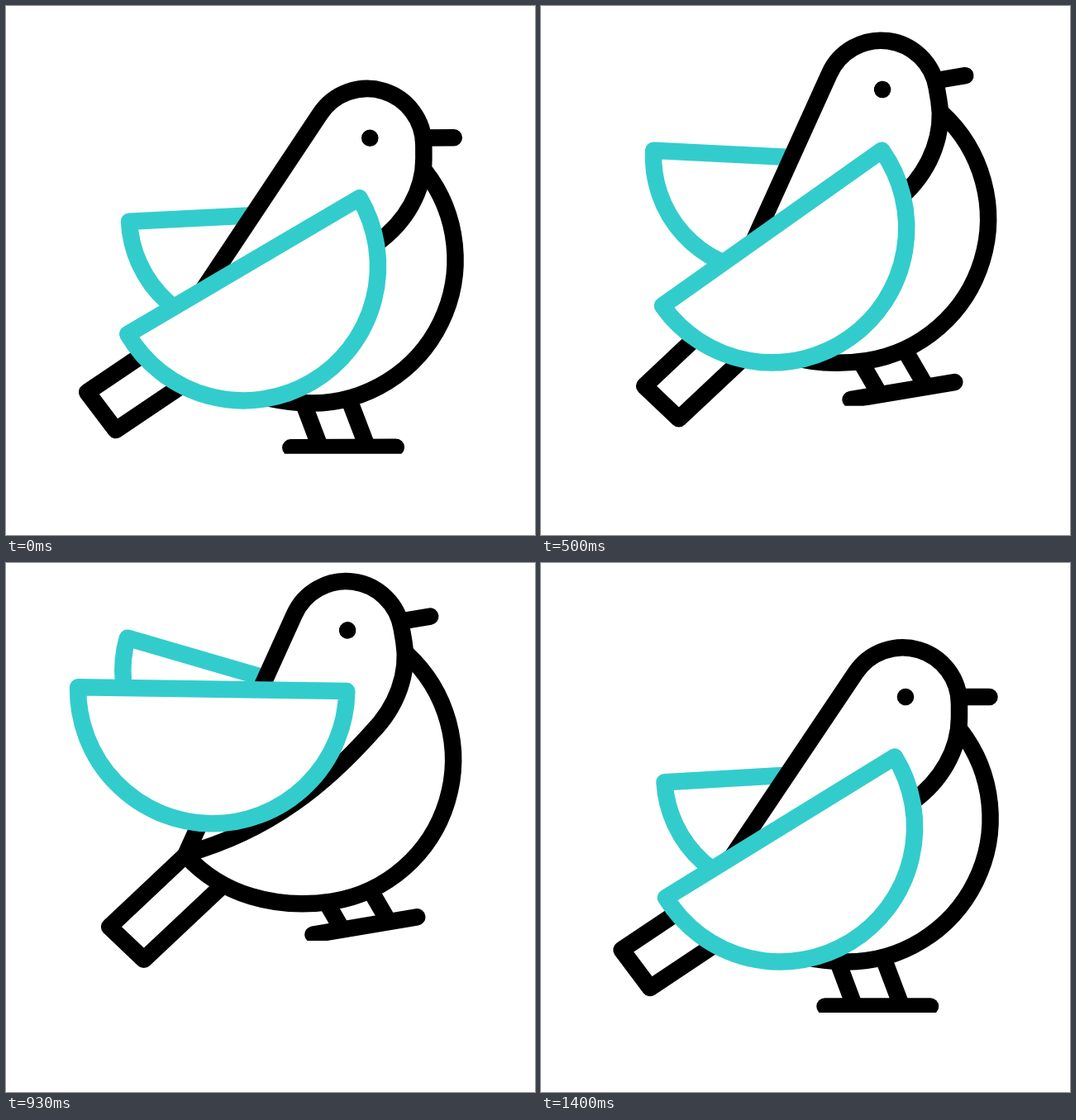
An HTML page with a canvas for the animation above (1670 ms loop, 640 by 640 pixels).

```html
<!DOCTYPE html>
<html lang="en">
<head>
<meta charset="utf-8">
<title>Bird</title>
<style>
html, body { margin: 0; width: 100%; height: 100%; overflow: hidden; background: #fff; }
canvas { display: block; width: 640px; height: 640px; }
</style>
</head>
<body>
<canvas id="stage" width="640" height="640"></canvas>
<script>
const ctx = document.getElementById("stage").getContext("2d");
const LOOP = 1670, BLACK = "#000", TEAL = "#33cccc", STROKE = 20.5;

// Eased progress from 0 to 1 between two steps.
function ease(step, from, to) {
  const u = Math.min(1, Math.max(0, (step - from) / (to - from)));
  return u * u * (3 - 2 * u);
}

// Rest, up to high, down to low, up to high again, back to rest.
function beat(step, { peak, dip, peak2, rest, high, low }) {
  return high * (ease(step, -1, peak) - ease(step, peak2, rest))
    + (high - low) * (ease(step, dip, peak2) - ease(step, peak, dip));
}

const hop = { peak: 9.2, dip: 19.8, peak2: 29.5, rest: 39, high: -65.2, low: -26.5 };
const lean = { ...hop, high: -9.54, low: -9.54 };
const nearFlap = { peak: 8.2, dip: 18.5, peak2: 28.6, rest: 40, high: 42.5, low: -7.6 };
const farFlap = { peak: 11.8, dip: 19.3, peak2: 31.2, rest: 41.5, high: 40.3, low: -22.7 };

const tail = new Path2D("M203 397.5L97.5 468L132 514L237 444");
const belly = new Path2D("M507 202A173.8 173.8 0 0 1 368 482.5C300 481 238 453 203 398");
const head = new Path2D("M203.5 396.5L380.5 133A68.4 68.4 0 0 1 506 171V187" +
  "C506 226 484 264 449 289C385 340 310 385 203.5 396.5Z");
const beak = new Path2D("M506 162H542.5");
const legs = new Path2D("M353 466L378 533M409 464L435 533");
const foot = new Path2D("M343.5 536.5H471");

const radians = degrees => degrees * Math.PI / 180;

function outline(path, color = BLACK) {
  ctx.strokeStyle = color;
  ctx.stroke(path);
}

function shape(path, color = BLACK) {
  ctx.fillStyle = "#fff";
  ctx.fill(path);
  outline(path, color);
}

function inBody(y, angle, paint) {
  ctx.save();
  ctx.translate(320, 320 + y);
  ctx.rotate(radians(angle));
  ctx.translate(-320, -320);
  paint();
  ctx.restore();
}

// A half disc hinged at its front corner.
function wing(x, y, chord, angle) {
  const half = new Path2D();
  half.arc(-chord / 2, 0, chord / 2, 0, Math.PI);
  half.closePath();
  ctx.save();
  ctx.translate(x, y);
  ctx.rotate(radians(angle));
  shape(half, TEAL);
  ctx.restore();
}

// The feet tuck in as the bird rises; a level edge trims their soles.
function drawFeet(y, angle) {
  const lift = -0.17 * y + 0.0021 * y * y;
  ctx.save();
  ctx.beginPath();
  ctx.rect(0, 0, 640, 544 + y - 0.92 * lift + 0.72 * angle);
  ctx.clip();
  ctx.translate(-0.4 * lift, -0.92 * lift);
  inBody(y, angle, () => {
    ctx.lineCap = "butt";
    outline(legs);
    ctx.lineCap = "round";
    outline(foot);
  });
  ctx.restore();
}

function draw(step) {
  const y = beat(step, hop), angle = beat(step, lean);
  ctx.fillStyle = "#fff";
  ctx.fillRect(0, 0, 640, 640);
  ctx.lineWidth = STROKE;
  ctx.lineCap = ctx.lineJoin = "round";

  drawFeet(y, angle);
  inBody(y, angle, () => {
    wing(429.5, 249, 280.5, beat(step, farFlap) - 3.3);
    shape(tail);
    shape(belly);
    outline(beak);
    shape(head);
    ctx.fillStyle = BLACK;
    ctx.beginPath();
    ctx.arc(441, 162, 10.3, 0, 2 * Math.PI);
    ctx.fill();
    wing(428, 234.5, 325.3, beat(step, nearFlap) - 31.6);
  });
}

// Thirty steps a second, each starting on a whole hundredth.
function stepAt(ms) {
  return Math.ceil(0.3 * (Math.floor(ms / 10) + 0.5)) - 1;
}

const start = performance.now();
function tick() {
  draw(stepAt((performance.now() - start) % LOOP));
  requestAnimationFrame(tick);
}
tick();
</script>
</body>
</html>
```
